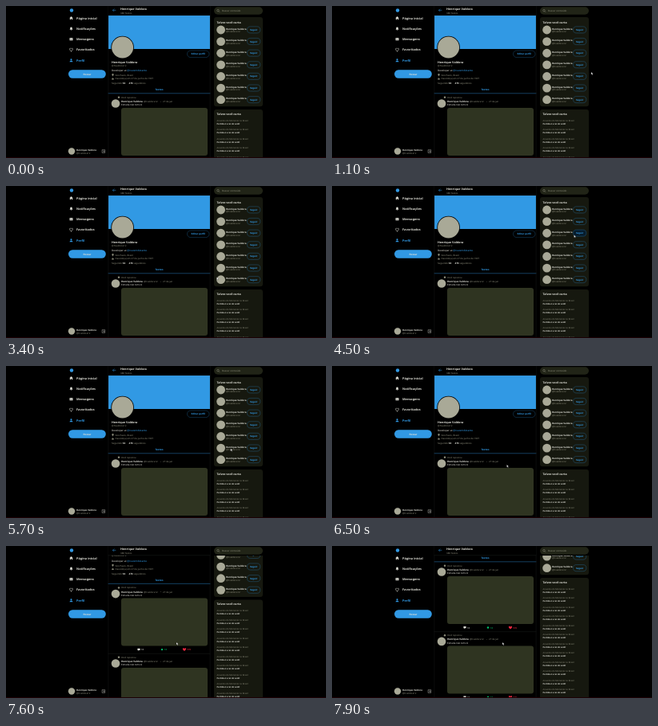
Animation of 400x191 px, one loop 8 s. Source, as an HTML page:

```html
<!DOCTYPE html>
<html lang="pt-BR">
<head>
<meta charset="utf-8">
<title>Perfil</title>
<style>
html, body { margin: 0; width: 100%; height: 100%; overflow: hidden; background: #000; }
svg { display: block; width: 100vw; height: 100vh; }
text { font-family: "Noto Sans", "Open Sans", sans-serif; text-rendering: geometricPrecision; white-space: pre; }
</style>
</head>
<body>
<svg id="stage" viewBox="0 0 400 191" xmlns="http://www.w3.org/2000/svg"></svg>
<script>
const WHITE = '#dcdcd4', GRAY = '#8b8b7a', BLUE = '#3199e4', OUTLINE = '#2f3330';
const AVATAR = '#a9a997', IMAGE = '#2f3421', PANEL = '#16180f', SEARCH = '#212417';
const GREEN = '#00c06b', RED = '#e8263e', EDGE = '#1c0004';
const NAME = 'Henrique Valdora', HANDLE = '@hvaldora12';
const LOOP = 8000, STEP = 100;

const text = (x, y, size, fill, content, bold = false, anchor = 'start') =>
  `<text x="${x}" y="${y}" font-size="${size}" fill="${fill}" font-weight="${bold ? 700 : 400}" text-anchor="${anchor}">${content}</text>`;
const circle = (x, y, r, fill) => `<circle cx="${x}" cy="${y}" r="${r}" fill="${fill}"/>`;
const rect = (x, y, w, h, fill, r = 0, extra = '') =>
  `<rect x="${x}" y="${y}" width="${w}" height="${h}" rx="${r}" fill="${fill}" ${extra}/>`;
const line = (d, color, width = 0.5) =>
  `<path d="${d}" fill="none" stroke="${color}" stroke-width="${width}" stroke-linecap="round" stroke-linejoin="round"/>`;
const at = (x, y, content) => `<g transform="translate(${x} ${y})">${content}</g>`;
const repeat = (n, make) => Array.from({ length: n }, (_, i) => make(i)).join('');
const outlined = (x, y, w, h, id = '') =>
  rect(x, y, w, h, 'transparent', h / 2, `stroke="${BLUE}" stroke-width=".25" ${id}`);

// Icons are drawn around their own centre
const heartPath = 'M0 1.9C-4-.7-1.4-2.9 0-1.1 1.4-2.9 4-.7 0 1.9Z';
const icons = {
  home: c => `<path d="M-2.2 0L0-2.1 2.2 0H1.6V2H.5V.7H-.5V2H-1.6V0Z" fill="${c}"/>`,
  bell: c => `<path d="M-1.9 1.2Q-1.3.7-1.3-.5A1.3 1.4 0 0 1 1.3-.5Q1.3.7 1.9 1.2ZM-.6 1.5H.6L0 2.2Z" fill="${c}"/>`,
  mail: c => rect(-2, -1.6, 4, 3.2, c, 0.4) + line('M-1.6-.9L0 .2 1.6-.9', '#000', 0.4),
  heart: c => `<path d="${heartPath}" fill="${c}"/>`,
  heartOutline: c => line(heartPath, c, 0.55),
  person: c => circle(0, -1, 1.05, c) + `<path d="M-2 2Q-2 .4 0 .4T2 2Z" fill="${c}"/>`,
  mark: c => circle(0, 0, 1.2, c),
  chat: c => `<path d="M-1.6-1.4H1.6V.8H.3L-.7 1.7V.8H-1.6Z" fill="${c}"/>`,
  pin: c => `<path d="M0 1.5Q-1.2 0-1.2-.5A1.2 1.2 0 0 1 1.2-.5Q1.2 0 0 1.5Z" fill="${c}"/>`,
  cake: c => rect(-1.2, -0.3, 2.4, 1.6, c, 0.2) + line('M0-.4V-1.2', c, 0.4),
  exit: c => line('M-1.6-1.9H1.6V1.9H-1.6ZM-.9 0H.8M.2-.7L.9 0 .2.7', c, 0.4)
};

function sidebar() {
  const items = [['home', 'Página inicial'], ['bell', 'Notificações'], ['mail', 'Mensagens'],
    ['heartOutline', 'Favoritados'], ['person', 'Perfil']];
  return circle(82, 5.5, 2.2, BLUE) +
    items.map(([icon, label], i) => {
      const y = 15.2 + i * 13.25, color = icon === 'person' ? BLUE : WHITE;
      return at(81.5, y, icons[icon](color)) + text(88, y + 1.4, 3.85, color, label, true);
    }).join('') +
    rect(78, 80.3, 46.8, 10.4, BLUE, 5.2) + text(101.4, 86.6, 3.1, WHITE, 'Postar', true, 'middle') +
    circle(82, 182.5, 4.2, AVATAR) + text(88, 182, 2.85, WHITE, NAME, true) +
    text(88, 185.6, 2.8, GRAY, HANDLE) + at(122.1, 182.6, icons.exit(WHITE));
}

function post(i) {
  return at(0, 87.4 * i,
    at(141, 114.8, icons.mark(GRAY)) + text(144, 115.8, 2.75, GRAY, 'Você repostou') +
    circle(137, 122.5, 5.3, AVATAR) +
    text(144, 121, 3.08, WHITE, NAME, true) + text(172, 121, 2.85, GRAY, HANDLE) +
    circle(193.6, 120.1, 0.35, GRAY) + text(196, 121, 2.85, GRAY, '27 de jun') +
    text(144, 125.2, 2.95, WHITE, 'Estrada não tem ré') +
    rect(144, 128, 108, 60, IMAGE, 3) +
    at(166, 192.5, icons.chat(WHITE)) + text(169, 193.6, 2.8, WHITE, '18') +
    at(195, 192.5, icons.mark(GREEN)) + text(198, 193.6, 2.8, GREEN, '18') +
    at(223, 192.5, icons.heart(RED)) + text(226.3, 193.6, 2.8, RED, '999') +
    line('M128 197.7H255', OUTLINE, 0.3));
}

function profile() {
  return rect(128, 12, 127, 42, BLUE) +
    circle(145.6, 52, 14.3, '#000') + circle(145.6, 52, 13.5, AVATAR) +
    outlined(226.5, 56, 27.5, 8.6, 'id="edit"') + text(240.2, 61.3, 2.95, BLUE, 'Editar perfil', true, 'middle') +
    text(132, 71.6, 3.7, WHITE, NAME, true) + text(132, 75.7, 3, GRAY, HANDLE) +
    text(132, 82, 3.1, WHITE, `Developer at <tspan fill="${BLUE}">@nuvemdistante</tspan>`) +
    at(133.5, 86.8, icons.pin(GRAY)) + text(136.5, 88, 2.9, GRAY, 'São Paulo, Brasil') +
    at(133.5, 91.2, icons.cake(GRAY)) + text(136.5, 92.4, 2.9, GRAY, 'Nascido(a) em 27 de junho de 1997') +
    text(132, 98.3, 2.95, GRAY, `Seguindo <tspan fill="${WHITE}" font-weight="700">94</tspan>`) +
    text(153.5, 98.3, 2.95, GRAY, `<tspan fill="${WHITE}" font-weight="700">470</tspan> seguidores`) +
    text(191.5, 106, 3.1, BLUE, 'Textos', true, 'middle') +
    line('M128 109.8H255', BLUE, 0.42) +
    repeat(3, post);
}

const followTop = i => 25.8 + 14.62 * i;

function suggestions() {
  return rect(260, 14, 61, 112.3, PANEL, 3) + text(263.5, 21.9, 3.55, WHITE, 'Talvez você curta', true) +
    repeat(7, i => {
      const y = followTop(i);
      return circle(268.6, y + 4.2, 5.4, AVATAR) +
        text(275, y + 3.7, 2.92, WHITE, NAME, true) + text(275, y + 7.5, 2.85, GRAY, HANDLE) +
        outlined(301.5, y, 16.3, 8.2, `id="follow${i}"`) +
        text(309.6, y + 5.1, 2.9, BLUE, 'Seguir', true, 'middle');
    }) +
    rect(260, 130, 61, 184, PANEL, 3) + text(263.5, 136.6, 3.55, WHITE, 'Talvez você curta', true) +
    repeat(15, i => text(263.5, 144.6 + 11.5 * i, 2.62, GRAY, 'Assuntos do Momento no Brasil') +
      text(263.5, 148.9 + 11.5 * i, 2.55, WHITE, 'Partida é a rei do você!', true));
}

function topBars() {
  return rect(128, 0, 127, 11.7, '#000') + line('M128 11.7H255', OUTLINE, 0.3) +
    line('M137 5.3H133.5M135 3.8L133.5 5.3 135 6.8', BLUE, 0.5) +
    text(143, 5, 3.75, WHITE, NAME, true) + text(143, 9.5, 2.9, GRAY, '380 Textos') +
    rect(259, 0, 63, 12, '#000') + rect(260, 1.3, 61, 9.4, SEARCH, 4.7) +
    `<circle cx="265" cy="5.6" r="1.3" fill="none" stroke="${GRAY}" stroke-width=".5"/>` +
    line('M266 6.6L267 7.6', GRAY, 0.5) + text(270, 7, 2.95, GRAY, 'Buscar conteúdo');
}

const stage = document.getElementById('stage');
stage.innerHTML = `<g id="page">${profile()}${suggestions()}</g>` +
  line('M127.9 0V191M255.1 0V191', OUTLINE, 0.25) + topBars() + sidebar() +
  rect(0, 190, 400, 1, EDGE) +
  '<path id="cursor" d="M0 0V3.2L.8 2.5 1.4 3.8 2 3.5 1.4 2.3H2.4Z" fill="#fff" stroke="#000" stroke-width=".2"/>';

const page = document.getElementById('page');
const cursor = document.getElementById('cursor');
const buttons = [{ el: document.getElementById('edit'), x: 226.5, y: 56, w: 27.5, h: 8.6 },
  ...Array.from({ length: 7 }, (_, i) =>
    ({ el: document.getElementById('follow' + i), x: 301.5, y: followTop(i), w: 16.3, h: 8.2 }))];

// [time, x, y]
const pointer = [[1000, 330, 87], [1100, 324, 83], [1200, 324, 83], [1500, 279, 70], [1600, 279, 70],
  [2000, 240, 84], [2300, 221, 97], [2600, 221, 97], [3100, 250, 110], [3500, 268, 116], [3900, 268, 116],
  [4200, 286, 84], [4500, 302.5, 61.5], [4800, 307, 61], [5100, 307, 61], [5600, 287, 96],
  [6000, 262, 127], [6200, 236, 131], [6300, 236, 131], [6500, 218.5, 124], [6800, 213, 121]];
// [time, offset]
const scrolling = [[6900, 0], [7000, 3], [7100, 9], [7300, 26], [7600, 62.4], [7800, 83], [7900, 90]];

function sample(keys, t) {
  const next = keys.findIndex(k => k[0] > t);
  if (next === 0) return keys[0].slice(1);
  if (next < 0) return keys[keys.length - 1].slice(1);
  const a = keys[next - 1], b = keys[next];
  const p = (t - a[0]) / (b[0] - a[0]);
  return a.slice(1).map((v, i) => v + (b[i + 1] - v) * p);
}

function draw(time) {
  const t = Math.floor((time % LOOP) / STEP) * STEP;
  const [x, y] = sample(pointer, t);
  const [offset] = sample(scrolling, t);
  const visible = t >= pointer[0][0];
  page.setAttribute('transform', `translate(0 ${-offset})`);
  cursor.setAttribute('transform', `translate(${x} ${y})`);
  cursor.setAttribute('visibility', visible ? 'visible' : 'hidden');
  for (const b of buttons) {
    const top = b.y - offset;
    const over = visible && x >= b.x && x <= b.x + b.w && y >= top && y <= top + b.h;
    b.el.setAttribute('fill', over ? '#071c2b' : 'transparent');
  }
}

const start = performance.now();
function tick() {
  draw(performance.now() - start);
  requestAnimationFrame(tick);
}
draw(0);
requestAnimationFrame(tick);
</script>
</body>
</html>
```
